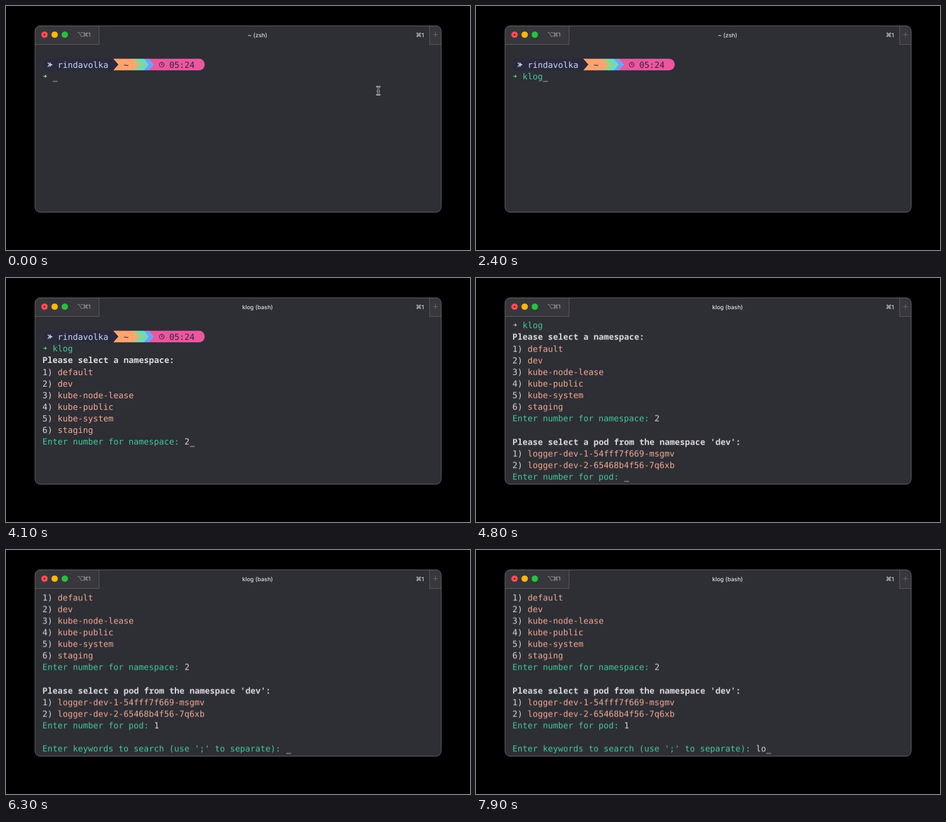
An HTML page that plays this animation: 800x422 px, repeating every 8 s.

```html
<!DOCTYPE html>
<html lang="en">
<head>
<meta charset="utf-8">
<title>Terminal</title>
<style>
  html, body { margin: 0; height: 100%; overflow: hidden; background: #000; }
  svg { display: block; width: 100vw; height: 100vh; }
  text { white-space: pre; text-rendering: geometricPrecision; }
  .mono { font: 14.535px "DejaVu Sans Mono", "Noto Sans Mono", monospace; fill: #d6d6d8; }
  .ui { font: 500 9.9px Inter, Roboto, sans-serif; fill: #dededf; }
  .bold { font: 700 14.583px "Noto Sans Mono", "DejaVu Sans Mono", monospace; fill: #dadadb; }
  .item { fill: #efaa94; }
  .ask { fill: #43c998; }
  .dark { fill: #33243a; }
  .line { fill: none; stroke: #5a5a5e; }
  .anim { animation: 8s step-end -20ms infinite; }
</style>
</head>
<body>
<svg viewBox="0 0 800 422">
  <defs>
    <clipPath id="frame"><rect x="50" y="34" width="700" height="323" rx="9"/></clipPath>
    <clipPath id="body"><rect x="51" y="73.5" width="698" height="282.5"/></clipPath>
    <path id="cmd" d="M2.7 2.7h2.6v2.6H2.7zM2.7 2.7V1.6A1.1 1.1 0 1 0 1.6 2.7zM5.3 2.7h1.1A1.1 1.1 0 1 0 5.3 1.6zM5.3 5.3v1.1A1.1 1.1 0 1 0 6.4 5.3zM2.7 5.3H1.6A1.1 1.1 0 1 0 2.7 6.4z" fill="none"/>
    <path id="beam" d="M639.5 139.5q2.4 0 2.4 2.2v9.6q0 2.2-2.4 2.2M644.3 139.5q-2.4 0-2.4 2.2v9.6q0 2.2 2.4 2.2M640.5 147.5h2.8" fill="none" stroke-linecap="round"/>
  </defs>

  <g clip-path="url(#frame)">
    <rect x="50" y="34" width="700" height="323" fill="#2e2e35"/>
    <path d="M50 34h110v32H50zM731 34h19v32h-19z" fill="#37373c"/>
    <path class="line" d="M50 66.5h110.5V34M750 66.5h-19.5V34"/>
  </g>
  <rect class="line" x="50" y="34.3" width="700.3" height="322.4" rx="9" style="stroke:#69696d"/>

  <circle cx="66.4" cy="49.5" r="5.5" fill="#fc4e56"/>
  <circle cx="66.4" cy="49.5" r="1.5" fill="#8d1119"/>
  <circle cx="83.9" cy="49.5" r="5.5" fill="#fdb711"/>
  <circle cx="101.4" cy="49.5" r="5.5" fill="#26c03f"/>
  <g stroke="#9b9b9f">
    <path d="M123.5 46h2.7l3.6 6.6h2.7M128.8 46h3.7" fill="none"/>
    <use href="#cmd" x="133.2" y="45.3"/>
  </g>
  <text class="ui" x="141.8" y="53" style="fill:#a3a3a6">1</text>
  <use href="#cmd" x="707.6" y="45.8" stroke="#d0d0d2"/>
  <text class="ui" x="716.4" y="53.6">1</text>
  <path class="line" d="M736.5 49.5h8M740.5 45.5v8" style="stroke:#6d6d71"/>
  <text class="ui anim" x="433.7" y="53.5" text-anchor="middle" style="animation-name:idle">~ (zsh)</text>
  <text class="ui anim" x="433.7" y="53.5" text-anchor="middle" style="animation-name:busy">klog (bash)</text>

  <g clip-path="url(#body)">
    <g id="screen" class="anim" style="animation-name:scroll">
      <g id="prompt" class="anim" style="animation-name:top">
        <path d="M71.3 91.3a8.8 10 0 0 0 0 20H194v-20z" fill="#2a2a3f"/>
      </g>
      <path class="anim" style="animation-name:arrow" d="M64.2 121.5h5.2M67.2 119.2l2.4 2.3-2.4 2.3" fill="none" stroke-width="1.1"/>
      <g class="anim" style="animation-name:cursor">
        <rect class="anim" style="animation-name:blink" x="63" y="89.4" width="8.5" height="1.5" fill="#8f8f94"/>
      </g>
    </g>
  </g>

  <g class="anim" style="animation-name:pointer">
    <use href="#beam" stroke="#ececec" stroke-width="2.6"/>
    <use href="#beam" stroke="#1c1c20" stroke-width=".9"/>
  </g>
</svg>
<script>
  const LOOP = 8000, LEFT = 62.8, COL = 8.75, ROW = 20.13;
  const screen = document.getElementById('screen');
  const prompt = document.getElementById('prompt');
  const sheet = document.head.appendChild(document.createElement('style'));

  function add(parent, tag, attrs, content = '') {
    const node = document.createElementNS('http://www.w3.org/2000/svg', tag);
    for (const key in attrs) node.setAttribute(key, attrs[key]);
    node.textContent = content;
    return parent.appendChild(node);
  }

  // Each step is [ms, declaration], held until the next one.
  function keyframes(name, steps) {
    const stops = [...steps, [LOOP, steps.at(-1)[1]]];
    sheet.append(`@keyframes ${name}{${stops.map(([ms, rule]) => `${ms / LOOP * 100}%{${rule}}`).join('')}}`);
  }
  const toggle = (name, times, on = true) =>
    keyframes(name, [0, ...times].map((ms, i) => [ms, `opacity:${+(on === (i % 2 === 0))}`]));

  function write(row, col, content, style = '', from = 0, parent = screen) {
    const node = add(parent, 'text', { class: `mono ${style}`, x: LEFT + col * COL, y: 87 + row * ROW }, content);
    if (from) {
      toggle(`at${from}`, [from], false);
      node.classList.add('anim');
      node.style.animationName = `at${from}`;
    }
    return node;
  }

  function menu(row, heading, items, question, from) {
    write(row, 0, heading, 'bold', from);
    items.forEach((item, i) => {
      write(row + 1 + i, 0, `${i + 1})`, '', from);
      write(row + 1 + i, 3, item, 'item', from);
    });
    write(row + 1 + items.length, 0, question, 'ask', from);
  }

  // Powerline segments, painted right to left so every tip overlaps its neighbour.
  add(prompt, 'path', { d: 'M246 91.3h87.8a8.8 10 0 0 1 0 20H246z', fill: '#ec569f' });
  [[237.5, 246.3, '#6ba4f8'], [228.8, 237.5, '#74d5c6'], [220, 228.8, '#83da91'],
   [185, 220, '#fea471'], [180, 185, '#2a2a3f']].forEach(([x, end, fill]) =>
    add(prompt, 'path', { d: `M${x} 91.3H${end}l8.8 10l-8.8 10H${x}z`, fill }));
  const outline = (d, stroke, width) =>
    add(prompt, 'path', { d, stroke, fill: 'none', 'stroke-width': width });
  outline('M72 98l3.2 3.5-3.2 3.5M75 98l3.2 3.5-3.2 3.5M74 101.5h6', '#d5dbe8', 1.3);
  outline('M264.4 101.5a4.1 4.1 0 1 1 0 .1zM268.5 99v2.7h2', '#4a2444', 1.1);
  write(1, 3, 'rindavolka', '', 0, prompt).style.fill = '#c9d6f2';
  write(1, 16, '~', 'dark', 0, prompt);
  write(1, 25, '05:24', 'dark', 0, prompt);

  const typed = [1700, 2000, 2200, 2400];
  typed.forEach((ms, i) => {
    write(2, 2 + i, 'klog'[i], '', ms).style.animationName = `at${ms}, command`;
  });
  menu(3, 'Please select a namespace:',
    ['default', 'dev', 'kube-node-lease', 'kube-public', 'kube-system', 'staging'],
    'Enter number for namespace:', 3100);
  write(10, 28, '2', '', 4100);
  menu(12, "Please select a pod from the namespace 'dev':",
    ['logger-dev-1-54fff7f669-msgmv', 'logger-dev-2-65468b4f56-7q6xb'],
    'Enter number for pod:', 4700);
  write(15, 22, '1', '', 6000);
  write(17, 0, "Enter keywords to search (use ';' to separate):", 'ask', 6300);
  write(17, 48, 'l', '', 7600);
  write(17, 49, 'o', '', 7900);

  keyframes('command', [[0, 'fill:#efaa94'], [2400, 'fill:#43c998']]);
  keyframes('arrow', [[0, 'stroke:#c3dccb'], [1500, 'stroke:#5fdd9c'], [4700, 'stroke:#c9d8b4']]);
  keyframes('scroll', [[0, 0], [4700, 2], [6300, 4]]
    .map(([ms, rows]) => [ms, `transform:translateY(${-rows * ROW}px)`]));
  keyframes('cursor', [
    [0, 2, 2], ...typed.map((ms, i) => [ms, 2, 3 + i]),
    [2800, 3, 0], [3100, 10, 28], [4100, 10, 29], [4400, 11, 0],
    [4700, 15, 22], [6000, 15, 23], [6300, 17, 48], [7600, 17, 49], [7900, 17, 50]
  ].map(([ms, row, col]) => [ms, `transform:translate(${col * COL}px,${row * ROW}px)`]));
  toggle('blink', [100, 700, 1300, 1700, 3700, 4100, 5500, 6000, 6800, 7400]);
  toggle('top', [4700]);
  toggle('pointer', [1700]);
  toggle('idle', [2900]);
  toggle('busy', [2900], false);
</script>
</body>
</html>
```
